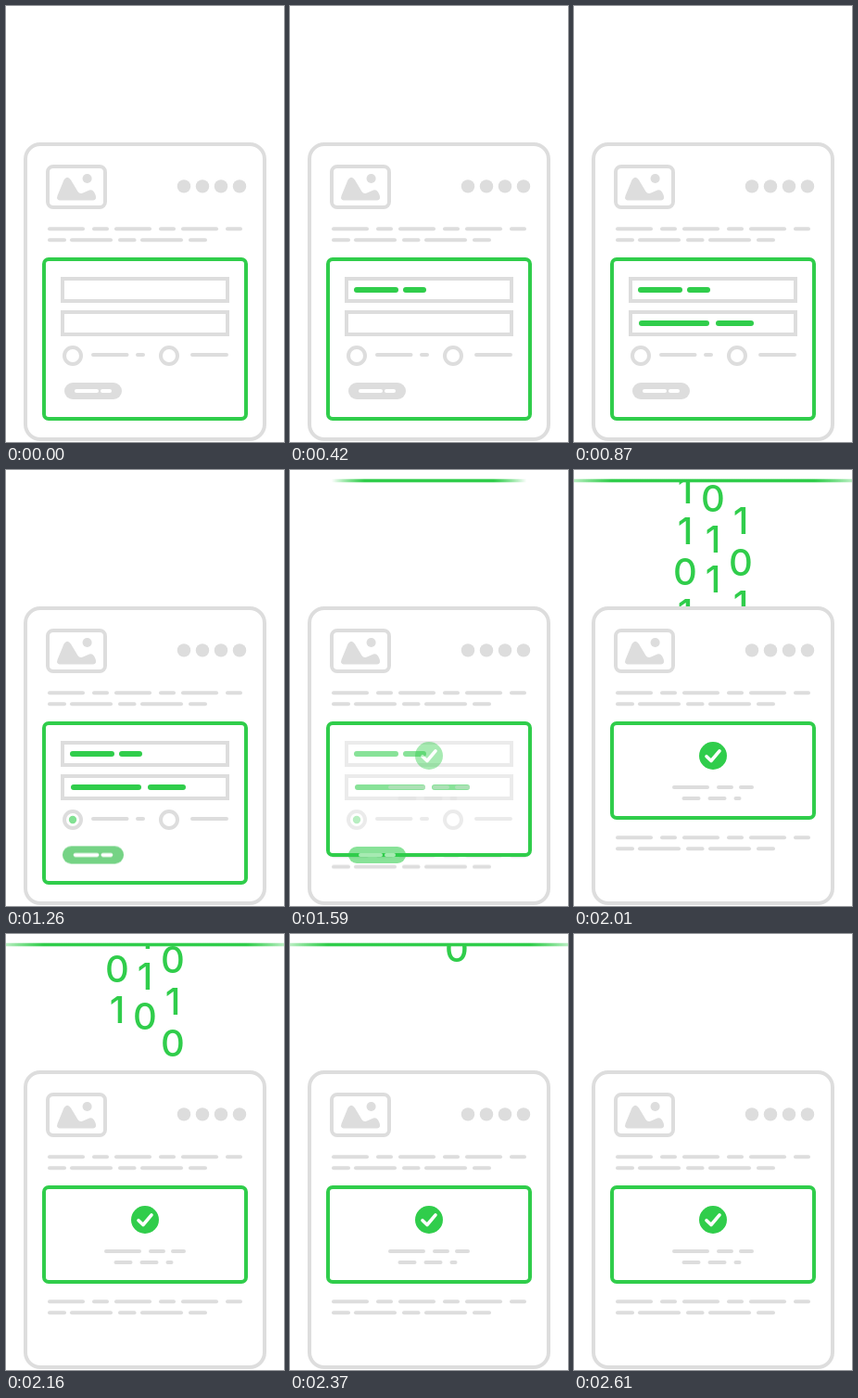
These frames come from a looping animation (300x470 px, 3030 ms). An HTML page:

```html
<!DOCTYPE html>
<html lang="en">
<head>
<meta charset="utf-8">
<title>Form submission</title>
<style>
  html, body { margin: 0; width: 100%; height: 100%; overflow: hidden; background: #fff; }
  svg { display: block; width: 300px; height: 470px; --green: #30cd4b; --grey: #ddd; }
  .box { fill: none; stroke: var(--grey); stroke-width: 4; }
  .grey { fill: var(--grey); }
  .green { fill: var(--green); }
  .white { fill: #fff; }
  .digits { font: 500 40px Inter, Roboto, sans-serif; text-anchor: middle; fill: var(--green); }
  #panel { fill: #fff; stroke: var(--green); stroke-width: 4; }
  #button, #line { transform-box: fill-box; transform-origin: center; }
  .wipe { transform-box: fill-box; transform-origin: left; }
</style>
</head>
<body>
<svg viewBox="0 0 300 470">
  <defs>
    <linearGradient id="fade">
      <stop offset="0" stop-color="#30cd4b" stop-opacity="0"/>
      <stop offset=".17" stop-color="#30cd4b"/>
      <stop offset=".83" stop-color="#30cd4b"/>
      <stop offset="1" stop-color="#30cd4b" stop-opacity="0"/>
    </linearGradient>
    <clipPath id="stream"><rect x="90" y="12" width="120" height="135"/></clipPath>
    <clipPath id="clip1"><rect id="wipe1" class="wipe" x="69" y="300" width="78" height="12"/></clipPath>
    <clipPath id="clip2"><rect id="wipe2" class="wipe" x="70" y="336" width="124" height="12"/></clipPath>
  </defs>

  <g clip-path="url(#stream)"><g id="digits" class="digits"></g></g>
  <g id="line" fill="url(#fade)">
    <rect x="-15" y="9" width="330" height="5" opacity=".3"/>
    <rect x="-15" y="10" width="330" height="3"/>
  </g>

  <rect class="box" x="21" y="149" width="258" height="318" rx="16"/>
  <rect class="box" x="45" y="173" width="62" height="44" rx="6"/>
  <circle class="grey" cx="87.6" cy="186" r="5"/>
  <path class="grey" d="M58 209.5Q54 209 55.5 204.5L62.5 187.5Q66 182 70 187.5L77.5 200Q79.500 203 83 201.500L90 198.500Q93 197.500 95 200.500L96.500 203.500Q98.500 209 94 209.500Z"/>
  <g id="dots" class="grey"></g>
  <g id="top" class="grey"></g>
  <g id="bottom" class="grey"></g>

  <rect id="panel" x="41" y="273" width="218" height="172" rx="5"/>

  <g id="form">
    <rect class="box" x="61" y="294" width="178" height="24"/>
    <rect class="box" x="61" y="330" width="178" height="24"/>
    <g id="text1" class="green" clip-path="url(#clip1)"></g>
    <g id="text2" class="green" clip-path="url(#clip2)"></g>
    <circle class="box" cx="72" cy="377" r="9"/>
    <circle class="box" cx="176" cy="377" r="9"/>
    <circle id="radio" class="green" cx="72" cy="377" r="4.2"/>
    <g id="labels" class="grey"></g>
    <g id="button">
      <rect id="pill" x="63" y="406" width="62" height="18" rx="9" fill="#ddd"/>
      <g id="caption" class="white"></g>
    </g>
  </g>

  <g id="done">
    <circle class="green" cx="150" cy="308" r="15"/>
    <path d="M143 308.700L148 313.500L157 302.800" fill="none" stroke="#fff" stroke-width="3.6" stroke-linecap="round" stroke-linejoin="round"/>
    <g id="message" class="grey"></g>
  </g>
</svg>
<script>
const LOOP = 3030;
const $ = id => document.getElementById(id);

function add(parent, tag, attrs, text = '') {
  const el = document.createElementNS('http://www.w3.org/2000/svg', tag);
  for (const key in attrs) el.setAttribute(key, attrs[key]);
  el.textContent = text;
  $(parent).append(el);
}

// Row of rounded dashes; spans holds start and end pairs.
function dashes(parent, y, spans, h = 4) {
  for (let i = 0; i < spans.length; i += 2) {
    add(parent, 'rect', {
      x: spans[i], y: y - h / 2, width: spans[i + 1] - spans[i], height: h, rx: h / 2
    });
  }
}

function paragraph(parent, y) {
  dashes(parent, y, [45, 85, 93, 111, 117, 157, 165, 183, 189, 229, 237, 255]);
  dashes(parent, y + 12, [45, 65, 69, 115, 121, 140.5, 145, 191, 197, 217]);
}

paragraph('top', 240.3);
paragraph('bottom', 396.3);
dashes('text1', 306, [69, 117, 122, 147], 6);
dashes('text2', 342, [70, 146, 153, 194], 6);
dashes('labels', 376, [92, 132.5, 140, 150, 199, 240]);
dashes('caption', 415, [74, 100, 102, 114]);
dashes('message', 342, [106, 146, 154, 172, 178, 194]);
dashes('message', 354, [116.5, 136.5, 144.5, 164.5, 172.5, 180.5]);
for (let x = 192; x < 260; x += 20) add('dots', 'circle', { cx: x, cy: 194.4, r: 7.2 });

[[120, 22, 44, '1101'], [150, 31, 43.5, '0110'], [180, 55, 45, '1010']]
  .forEach(([x, y, gap, bits]) => [...bits].forEach((bit, i) =>
    add('digits', 'text', { x, y: y + i * gap + 14.5 }, bit)));

// Each step is [ms, value, easing towards the next step].
function animate(id, prop, steps) {
  const first = steps[0], last = steps[steps.length - 1];
  const frames = [[0, first[1]], ...steps, [LOOP, last[1]]].map(([ms, value, easing = 'linear']) =>
    ({ offset: ms / LOOP, [prop]: value, easing }));
  $(id).animate(frames, { duration: LOOP, iterations: Infinity });
}

const SOFT = 'ease-in-out';
const SWAP = [1440, 1770];
const swap = (id, prop, from, to) => animate(id, prop, [[SWAP[0], from, SOFT], [SWAP[1], to]]);

animate('wipe1', 'transform', [[155, 'scaleX(0)'], [415, 'scaleX(1)']]);
animate('wipe2', 'transform', [[450, 'scaleX(0)'], [734, 'scaleX(1)']]);
animate('radio', 'opacity', [[880, 0], [960, .6]]);
animate('pill', 'fill', [[1080, '#dddddd'], [1380, '#30cd4b']]);
animate('button', 'transform', [
  [1080, 'scale(1)', SOFT], [1230, 'scale(1.065)'], [1260, 'scale(1.065)', SOFT], [1440, 'scale(1)']
]);

swap('form', 'opacity', 1, 0);
swap('done', 'opacity', 0, 1);
swap('panel', 'height', '172px', '102px');
swap('bottom', 'transform', 'translateY(34px)', 'translateY(0px)');

animate('line', 'transform', [
  [1440, 'scaleX(0)', SOFT], [1700, 'scaleX(1)'], [2455, 'scaleX(1)', SOFT], [2605, 'scaleX(0)']
]);
animate('digits', 'transform', [[1690, 'translateY(154.6px)'], [2440, 'translateY(-207.7px)']]);
</script>
</body>
</html>
```
